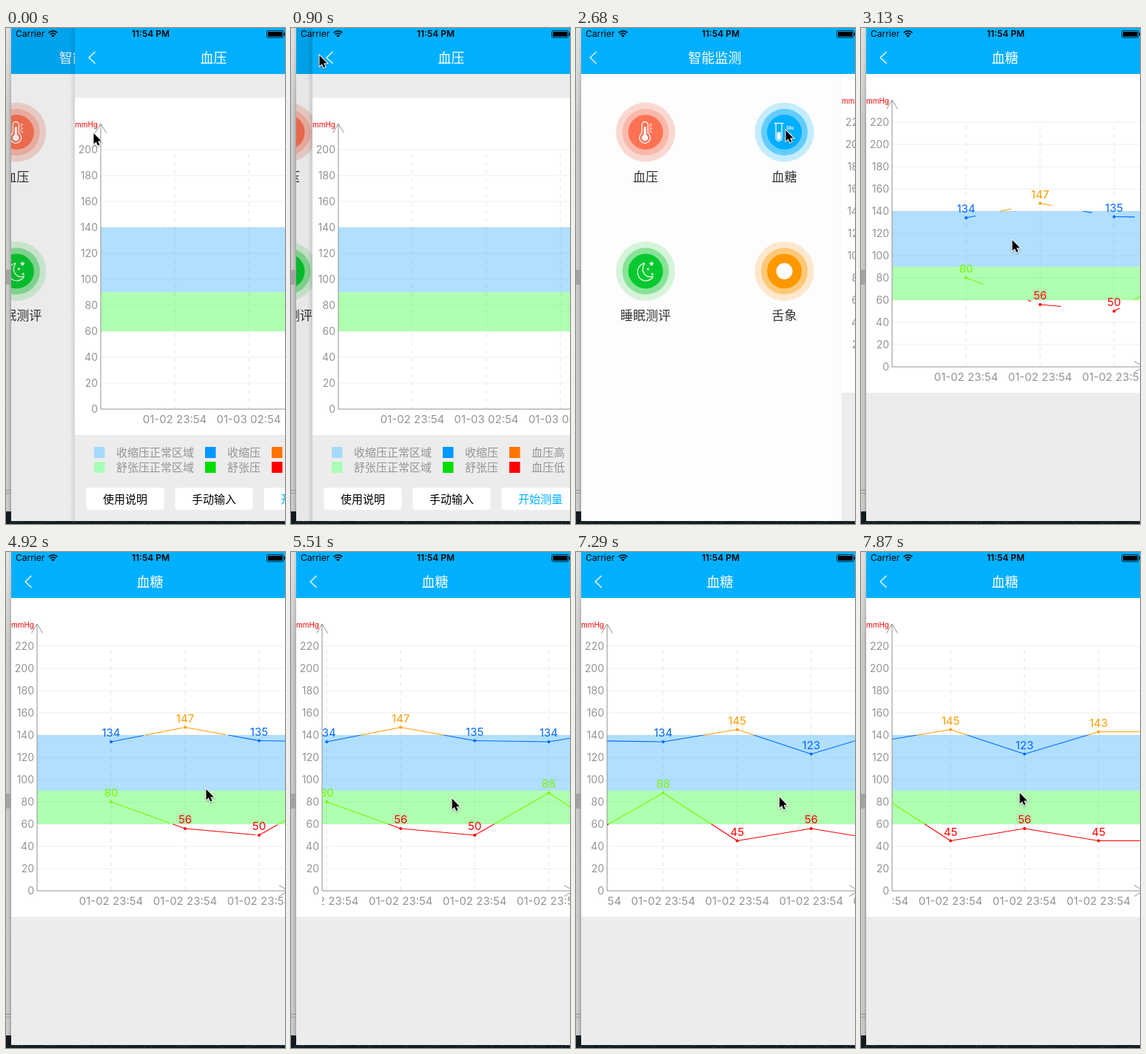
These frames come from a looping animation (377 px wide and 669 px high, 8 s). An HTML page with a canvas:

```html
<!DOCTYPE html>
<html lang="zh-CN">
<head>
<meta charset="utf-8">
<style>
html, body { margin: 0; width: 100%; height: 100%; overflow: hidden; background: #141b1f; }
canvas { display: block; width: 377px; height: 669px; }
</style>
</head>
<body>
<canvas id="stage"></canvas>
<script>
const W = 377, H = 669, LEFT = 7, PHONE_W = 375, PHONE_H = 665;
const LOOP = 8000, TICKS = 54;
const BLUE = '#00b0ff', GREY = '#ececec', TEXT = '#949494', WHITE = '#fff';
const HIGH = '#ff9c00', NORMAL = '#0068ff', GOOD = '#78f800', LOW = '#ff0000';
const SANS = 'Inter, "Noto Sans CJK SC", "Noto Sans CJK JP", "Noto Sans CJK", sans-serif';

const canvas = document.getElementById('stage');
const ctx = canvas.getContext('2d');
const dpr = window.devicePixelRatio || 1;
canvas.width = W * dpr;
canvas.height = H * dpr;

// Motion keys: [tick, value, ...]
const READING_X = [[0, 86], [1, 58], [2, 14], [3, 2], [4, 0], [5, 0], [6, 22], [7, 240], [8, 345], [9, 370], [10, PHONE_W]];
const SUGAR_X = [[17, PHONE_W], [18, 352], [19, 130], [20, 18], [21, 0]];
const STROKE = [[17, 0], [18, 0.08], [21, 0.28], [25, 0.54], [32, 0.92], [33, 0.95], [34, 1]];
const SCROLL = [[33, 0], [36, 70], [40, 165], [43, 220.5], [47, 300], [48, 300], [53, 421]];
const POINTER = [
  [0, 118.5, 142], [2, 70, 90], [4, 38.5, 37], [7, 38.5, 37], [12, 283.5, 138],
  [18, 283.5, 138], [21, 204.5, 286], [25, 225, 300], [33, 270.5, 320],
  [40, 178, 342], [43, 146.5, 347], [48, 290, 332], [53, 214.5, 325]
];

function keyed(keys, tick, i = 1) {
  if (tick <= keys[0][0]) return keys[0][i];
  for (let k = 1; k < keys.length; k++) {
    const a = keys[k - 1], b = keys[k];
    if (tick <= b[0]) return a[i] + (b[i] - a[i]) * (tick - a[0]) / (b[0] - a[0]);
  }
  return keys[keys.length - 1][i];
}

function rect(x, y, w, h, fill) {
  ctx.fillStyle = fill;
  ctx.fillRect(x, y, w, h);
}

function disc(x, y, r, fill) {
  ctx.fillStyle = fill;
  ctx.beginPath();
  ctx.arc(x, y, r, 0, Math.PI * 2);
  ctx.fill();
}

function line(points, color, width = 1) {
  ctx.strokeStyle = color;
  ctx.lineWidth = width;
  ctx.beginPath();
  points.forEach(([x, y]) => ctx.lineTo(x, y));
  ctx.stroke();
}

// y is the optical middle of the text
function text(str, x, y, size, color, align = 'center', weight = 400) {
  ctx.font = `${weight} ${size}px ${SANS}`;
  ctx.textAlign = align;
  ctx.fillStyle = color;
  ctx.fillText(str, x, y + size * 0.37);
}

function clipped(x, y, w, h, draw) {
  ctx.save();
  ctx.beginPath();
  ctx.rect(x, y, w, h);
  ctx.clip();
  draw();
  ctx.restore();
}

function desktop() {
  rect(0, 0, W, H, '#141b1f');
  let g = ctx.createLinearGradient(0, 0, LEFT, 0);
  g.addColorStop(0, '#cfcfcf');
  g.addColorStop(0.6, '#c2c2c2');
  g.addColorStop(1, '#a2a2a2');
  rect(0, 0, LEFT, 652, g);
  g = ctx.createLinearGradient(0, 0, 0, 130);
  g.addColorStop(0, 'rgba(255,255,255,.45)');
  g.addColorStop(1, 'rgba(255,255,255,0)');
  rect(0, 0, LEFT, 130, g);
  rect(0, 326, LEFT, 20, '#a3a3a3');
  rect(0, 623, LEFT, 1, '#8b8b8b');
  rect(0, 627, LEFT, 1, '#9a9a9a');
  let seed = 7;
  for (let x = 0; x < W; x += 5) {
    seed = (seed * 73 + 41) % 257;
    rect(x, 665 + seed % 3, 3, 1.5, `rgba(70,105,115,${seed / 700})`);
  }
}

function header(title) {
  rect(LEFT, 0, PHONE_W, 62, BLUE);
  line([[34.5, 32], [26, 40], [34.5, 48]], WHITE, 1.2);
  text(title, 194.5, 40, 18, WHITE);
}

function rings(x, y, outer, mid, inner) {
  disc(x, y, 40, outer);
  disc(x, y, 31.5, mid);
  disc(x, y, 23.5, inner);
}

function star(x, y, r) {
  ctx.fillStyle = WHITE;
  ctx.beginPath();
  for (let i = 0; i < 10; i++) {
    const a = i * Math.PI / 5 - Math.PI / 2, d = i % 2 ? r * 0.42 : r;
    ctx.lineTo(x + d * Math.cos(a), y + d * Math.sin(a));
  }
  ctx.fill();
}

function thermometer(x, y) {
  ctx.strokeStyle = WHITE;
  ctx.lineWidth = 1.3;
  ctx.beginPath();
  ctx.arc(x, y - 10, 4, Math.PI, 0);
  ctx.lineTo(x + 4, y + 1.5);
  ctx.arc(x, y + 7.5, 7.3, -0.96, Math.PI + 0.96);
  ctx.closePath();
  ctx.stroke();
  disc(x, y + 7.5, 4.3, WHITE);
  rect(x - 1.5, y - 7, 3, 12, WHITE);
  for (let i = 0; i < 5; i++) rect(x + 6, y - 11 + i * 2.6, i % 2 ? 2.5 : 4, 1, WHITE);
}

function testTube(x, y) {
  line([[x - 14, y - 12], [x - 1, y - 12]], WHITE, 1.2);
  ctx.beginPath();
  ctx.moveTo(x - 11.5, y - 12);
  ctx.lineTo(x - 11.5, y + 8);
  ctx.arc(x - 7.5, y + 8, 4, Math.PI, 0, true);
  ctx.lineTo(x - 3.5, y - 12);
  ctx.stroke();
  ctx.beginPath();
  ctx.moveTo(x - 10, y);
  ctx.lineTo(x - 10, y + 8);
  ctx.arc(x - 7.5, y + 8, 2.5, Math.PI, 0, true);
  ctx.lineTo(x - 5, y);
  ctx.fillStyle = WHITE;
  ctx.fill();
  text('Glu', x + 7.5, y - 6, 6, WHITE, 'center', 700);
  ctx.beginPath();
  ctx.moveTo(x + 8, y + 1);
  ctx.quadraticCurveTo(x + 11.5, y + 6, x + 11, y + 8.5);
  ctx.arc(x + 8, y + 8.5, 3, 0, Math.PI);
  ctx.quadraticCurveTo(x + 4.5, y + 6, x + 8, y + 1);
  ctx.fill();
}

function moon(x, y) {
  ctx.strokeStyle = WHITE;
  ctx.lineWidth = 1.2;
  ctx.beginPath();
  ctx.moveTo(x - 1, y - 11);
  ctx.bezierCurveTo(x - 15, y - 8, x - 14, y + 12, x, y + 13);
  ctx.bezierCurveTo(x + 5, y + 13, x + 9, y + 10, x + 10, y + 7);
  ctx.bezierCurveTo(x - 1, y + 10, x - 8, y - 1, x - 1, y - 11);
  ctx.stroke();
  star(x + 8, y - 10, 3.7);
  star(x + 3, y - 3, 2.4);
  star(x + 9, y + 4, 2.2);
}

function menuPage() {
  rect(LEFT, 0, PHONE_W, PHONE_H, WHITE);
  header('智能监测');
  const x1 = 101, x2 = 288.5, y1 = 140.5, y2 = 328;
  rings(x1, y1, '#fbdad3', '#fbb9ab', '#ff7354');
  thermometer(x1 - 1, y1);
  rings(x2, y1, '#c6eeff', '#64cfff', BLUE);
  testTube(x2, y1);
  rings(x1, y2, '#d8f6dc', '#89e598', '#07cb2f');
  moon(x1, y2);
  rings(x2, y2, '#ffeacf', '#ffcb78', '#ff9900');
  disc(x2, y2, 11, WHITE);
  text('血压', x1, 201, 17, '#333');
  text('血糖', x2, 201, 17, '#333');
  text('睡眠测评', x1, 388, 17, '#333');
  text('舌象', x2, 388, 17, '#333');
}

const AXIS = 42, STEP = 100, RIGHT = LEFT + PHONE_W;

function chart({ zero, max, unit, dates, scroll = 0, plot }) {
  const yOf = v => zero - v * unit;
  const top = yOf(max), tip = top - (zero === 514 ? 35 : 30);
  const xOf = i => AXIS + STEP * (i + 1) - scroll;

  for (let v = 20; v <= max; v += 20) line([[AXIS, yOf(v)], [RIGHT, yOf(v)]], '#eeeeee');
  clipped(AXIS, top, RIGHT - AXIS, zero - top + 30, () => {
    ctx.setLineDash([6, 5]);
    dates.forEach((d, i) => line([[xOf(i), top + 5], [xOf(i), zero]], '#e6e6e6'));
    ctx.setLineDash([]);
    dates.forEach((d, i) => text(d, xOf(i), zero + 13, 15, TEXT));
  });
  rect(AXIS, yOf(140), RIGHT - AXIS, 50 * unit, 'rgba(0,153,255,.31)');
  rect(AXIS, yOf(90), RIGHT - AXIS, 30 * unit, 'rgba(0,255,0,.31)');

  line([[AXIS, tip], [AXIS, zero], [RIGHT, zero]], '#919191');
  line([[AXIS - 7.5, tip + 12.5], [AXIS, tip], [AXIS + 7.5, tip + 12.5]], '#919191');
  line([[RIGHT - 13, zero - 7.5], [RIGHT, zero], [RIGHT - 13, zero + 7.5]], '#919191');
  for (let v = 0; v <= max; v += 20) text(String(v), 38, yOf(v), 14, TEXT, 'right');
  text('mmHg', 38, tip + 1, 10, LOW, 'right');
  if (plot) clipped(AXIS, top, RIGHT - AXIS, zero - top, () => plot(xOf, yOf));
}

// Each segment is split at the limit; every piece grows from its own start
function series(values, limit, above, below, p, xOf, yOf) {
  const hue = v => v >= limit ? above : below;
  const piece = (x0, v0, x1, v1) =>
    line([[x0, yOf(v0)], [x0 + (x1 - x0) * p, yOf(v0 + (v1 - v0) * p)]], hue((v0 + v1) / 2), 1.1);
  values.forEach((v, i) => {
    if (i + 1 < values.length) {
      const next = values[i + 1], x0 = xOf(i), x1 = xOf(i + 1);
      if ((v - limit) * (next - limit) < 0) {
        const xm = x0 + (x1 - x0) * (limit - v) / (next - v);
        piece(x0, v, xm, limit);
        piece(xm, limit, x1, next);
      } else piece(x0, v, x1, next);
    }
    disc(xOf(i), yOf(v), 2, hue(v));
    text(String(v), xOf(i), yOf(v) - 12.5, 15, hue(v));
  });
}

function button(x, label, color) {
  ctx.fillStyle = WHITE;
  ctx.beginPath();
  ctx.roundRect(x, 620, 105, 30, 4);
  ctx.fill();
  text(label, x + 52.5, 635, 15, color);
}

function readingPage() {
  rect(LEFT, 0, PHONE_W, PHONE_H, GREY);
  rect(LEFT, 94, PHONE_W, 455, WHITE);
  header('血压');
  chart({ zero: 514, max: 200, unit: 1.75, dates: ['01-02 23:54', '01-03 02:54', '01-03 05:54'] });
  const legend = [
    [33, '#a6dafb', '收缩压正常区域', '#a9ffb5', '舒张压正常区域'],
    [183, '#0099ff', '收缩压', '#00dd00', '舒张压'],
    [273, '#ff7400', '血压高', '#ff0000', '血压低']
  ];
  legend.forEach(([x, c1, t1, c2, t2]) => {
    rect(x, 565, 14.5, 15, c1);
    text(t1, x + 30, 572.5, 15, TEXT, 'left');
    rect(x, 585, 14.5, 15, c2);
    text(t2, x + 30, 592.5, 15, TEXT, 'left');
  });
  button(22.5, '使用说明', '#000');
  button(142.5, '手动输入', '#000');
  button(262.5, '开始测量', BLUE);
}

const SYSTOLIC = [134, 147, 135, 134, 145, 123, 143, 143];
const DIASTOLIC = [80, 56, 50, 88, 45, 56, 45, 45];

function sugarPage(p, scroll) {
  rect(LEFT, 0, PHONE_W, PHONE_H, GREY);
  rect(LEFT, 62, PHONE_W, 430, WHITE);
  header('血糖');
  chart({
    zero: 457, max: 220, unit: 1.5, scroll,
    dates: SYSTOLIC.map(() => '01-02 23:54'),
    plot(xOf, yOf) {
      series(SYSTOLIC, 140, HIGH, NORMAL, p, xOf, yOf);
      series(DIASTOLIC, 60, GOOD, LOW, p, xOf, yOf);
    }
  });
}

function shifted(dx, draw) {
  ctx.save();
  ctx.translate(dx, 0);
  draw();
  ctx.restore();
}

// Page sliding over the menu, which follows at 30 % and is dimmed
function slide(x, page) {
  if (x > 0) {
    shifted(-0.3 * (PHONE_W - x), menuPage);
    rect(LEFT, 0, PHONE_W, PHONE_H, `rgba(0,0,0,${0.1 * (1 - x / PHONE_W)})`);
    const edge = LEFT + x, g = ctx.createLinearGradient(edge - 7, 0, edge, 0);
    g.addColorStop(0, 'rgba(0,0,0,0)');
    g.addColorStop(1, `rgba(0,0,0,${0.13 * (1 - x / PHONE_W)})`);
    rect(edge - 7, 0, 7, PHONE_H, g);
  }
  if (x < PHONE_W) shifted(x, page);
}

function statusBar() {
  text('Carrier', 13, 8, 12, '#000', 'left');
  text('11:54 PM', 195.5, 8, 12, '#000', 'center', 600);
  ctx.strokeStyle = '#000';
  ctx.lineWidth = 1.7;
  for (const r of [8, 5]) {
    ctx.beginPath();
    ctx.arc(63.5, 12, r, -Math.PI * 0.76, -Math.PI * 0.24);
    ctx.stroke();
  }
  ctx.fillStyle = '#000';
  ctx.beginPath();
  ctx.moveTo(63.5, 12.5);
  ctx.arc(63.5, 12.5, 3, -Math.PI * 0.76, -Math.PI * 0.24);
  ctx.fill();
  ctx.lineWidth = 0.8;
  ctx.beginPath();
  ctx.roundRect(352.5, 3.5, 22.5, 9.5, 2);
  ctx.stroke();
  rect(354, 5, 19.5, 6.5, '#000');
  rect(375.8, 6.5, 1.2, 3.5, '#000');
}

function pointer(x, y) {
  ctx.save();
  ctx.translate(x, y);
  ctx.beginPath();
  [[0, 0], [0, 14.5], [3.3, 11.4], [5.6, 16.6], [8, 15.6], [5.7, 10.6], [10.3, 10.6]]
    .forEach(([px, py]) => ctx.lineTo(px, py));
  ctx.closePath();
  ctx.shadowColor = 'rgba(0,0,0,.35)';
  ctx.shadowBlur = 2 * dpr;
  ctx.shadowOffsetY = dpr;
  ctx.strokeStyle = WHITE;
  ctx.lineWidth = 2;
  ctx.stroke();
  ctx.shadowColor = 'transparent';
  ctx.fillStyle = '#000';
  ctx.fill();
  ctx.restore();
}

function draw(ms) {
  const tick = Math.floor((ms % LOOP) * TICKS / LOOP);
  ctx.setTransform(dpr, 0, 0, dpr, 0, 0);
  desktop();
  clipped(LEFT, 0, PHONE_W, PHONE_H, () => {
    if (tick < 10) slide(keyed(READING_X, tick), readingPage);
    else if (tick < 18) menuPage();
    else slide(keyed(SUGAR_X, tick), () => sugarPage(keyed(STROKE, tick), keyed(SCROLL, tick)));
    statusBar();
  });
  pointer(keyed(POINTER, tick), keyed(POINTER, tick, 2));
}

const start = performance.now();
function frame() {
  draw(performance.now() - start);
  requestAnimationFrame(frame);
}
frame();
</script>
</body>
</html>
```
